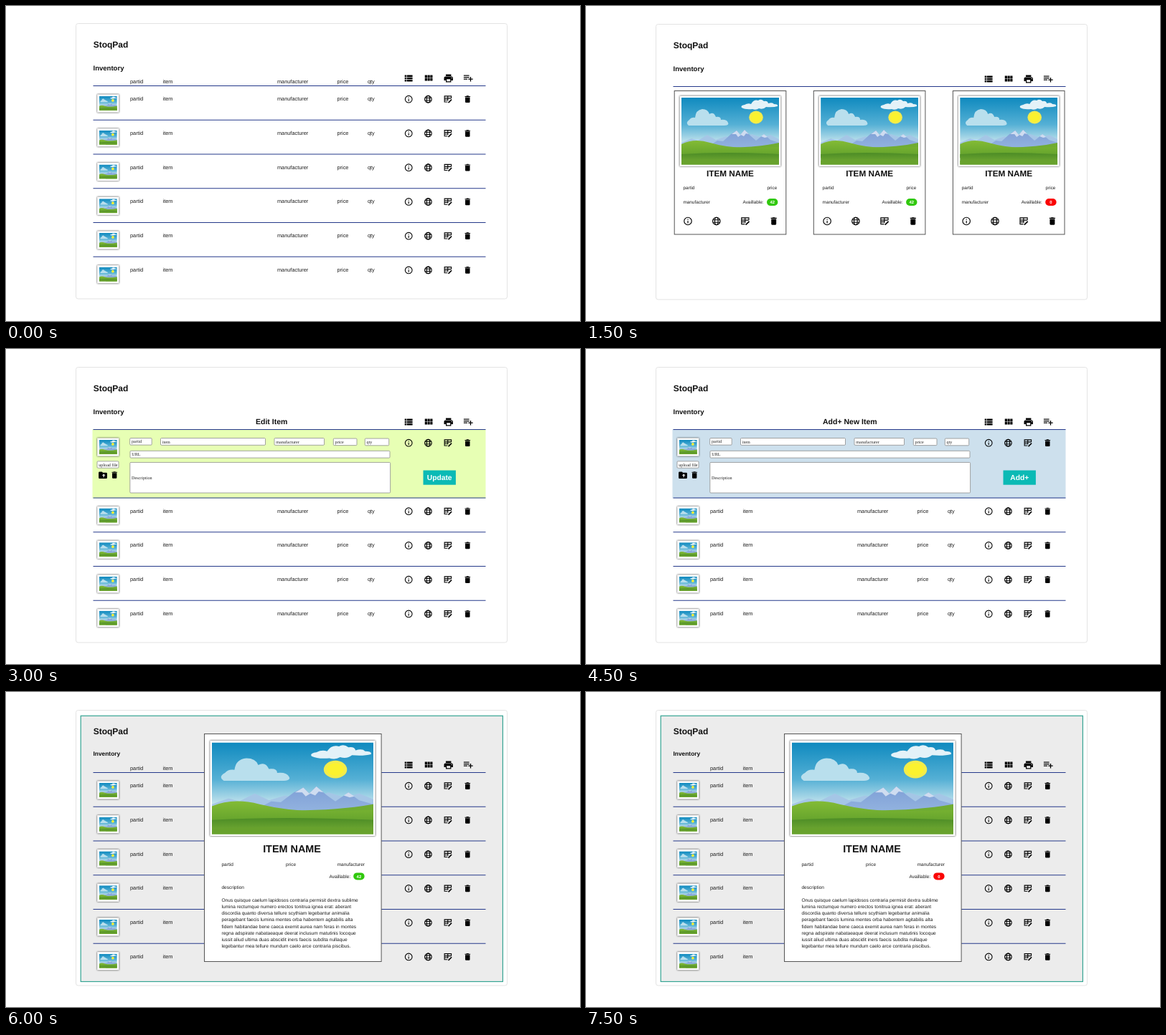
An HTML page that plays this animation: 800x440 px, repeating every 9 s.

```html
<!DOCTYPE html>
<html lang="en">
<head>
<meta charset="utf-8">
<title>Inventory</title>
<style>
  html, body { margin: 0; width: 100%; height: 100%; overflow: hidden; background: #fff; }
  svg { display: block; width: 100vw; height: 100vh; }
  text { font-family: "Liberation Sans", Arial, sans-serif; fill: #1c1c1c; text-rendering: geometricPrecision; white-space: pre; }
  .b { font-weight: bold; fill: #111; }
  .w { font-weight: bold; fill: #fff; }
  .serif { font-family: "Liberation Serif", "Times New Roman", serif; }
  .frame { fill: #fff; filter: drop-shadow(0 0 1.3px rgba(0, 0, 0, .85)); }
  .line { fill: none; stroke: #000; stroke-width: 2; }
</style>
</head>
<body>
<svg id="stage" viewBox="0 0 800 440" xmlns="http://www.w3.org/2000/svg">
  <defs>
    <linearGradient id="sky" x2="0" y2="1">
      <stop stop-color="#0f8abf"/><stop offset=".4" stop-color="#55b0d5"/><stop offset=".68" stop-color="#c9e6ee"/>
    </linearGradient>
    <linearGradient id="peak" x2="0" y2="1"><stop stop-color="#7f9fd6"/><stop offset="1" stop-color="#93b4e0"/></linearGradient>
    <linearGradient id="hill" x2="0" y2="1"><stop stop-color="#83bb35"/><stop offset="1" stop-color="#5f9f2b"/></linearGradient>
    <linearGradient id="field" x2="0" y2="1"><stop stop-color="#4c8c26"/><stop offset="1" stop-color="#7ab035"/></linearGradient>

    <symbol id="photo" viewBox="0 0 136 93.5" preserveAspectRatio="none">
      <path fill="url(#sky)" d="M0 0h136v94H0z"/>
      <path fill="#b9dfed" d="M10 39q-5-4 1-8q3-4 8-3q1-11 10-12q8 0 10 7q6-4 9 4q7-1 7 4q8-1 10 4q2 4-6 4z"/>
      <path fill="#e4f2f8" d="M84 14q-2-3 4-4q5-3 9-1q4-7 10-5q4-3 8 1q5-1 6 3q6-2 8 1q6 0 5 3q-6 2-16 1q-4 4-10 2q-4 3-9 1q-10 1-15-2z"/>
      <ellipse cx="104" cy="27.5" rx="9.8" ry="9" fill="#f3ec4a"/>
      <ellipse cx="104" cy="27.5" rx="7" ry="6.4" fill="#fbf22f"/>
      <path fill="#a5c6e6" d="M0 63l14-6 9 3 13-8 12 7 14-5 16 6 20-9 14 5 12-4 12 6v14H0z"/>
      <path fill="url(#peak)" d="M36 69l14-9 8 1 11-10 8-5 5 6 6-7 9 9 7 6 11-9 9 8 12 4v9z"/>
      <path fill="#cfdcf0" d="M70 51l7-5 5 6 6-7 6 6-4-1-3 4-4-2-4 3-3-4zM111 54l4-3 5 4-4 1z"/>
      <path fill="#70ac32" d="M50 69q50 2 86-6v30H50z"/>
      <path fill="url(#hill)" d="M0 65q18-9 40-2 24 7 50 7 24 0 46-1v15H0z"/>
      <path fill="url(#field)" d="M0 79q60-4 136 0v15H0z"/>
      <path fill="#68a22d" d="M0 88q70-4 136 0v6H0z"/>
    </symbol>

    <path id="list" d="M4 5h4v4H4zM4 10h4v4H4zM4 15h4v4H4zM9 5h12v4H9zM9 10h12v4H9zM9 15h12v4H9z"/>
    <path id="tiles" d="M4 5h5v6H4zM10 5h5v6h-5zM16 5h5v6h-5zM4 12h5v6H4zM10 12h5v6h-5zM16 12h5v6h-5z"/>
    <path id="print" fill-rule="evenodd" d="M6 3h12v4H6zM5 8h14q3 0 3 3v6h-4v4H6v-4H2v-6q0-3 3-3zM8 14v5h8v-5zM18 11a1 1 0 1 0 2 0 1 1 0 1 0-2 0z"/>
    <path id="add" d="M2 6h12v2H2zM2 10h12v2H2zM2 14h8v2H2zM16 10h2v4h4v2h-4v4h-2v-4h-4v-2h4z"/>
    <g id="info"><circle class="line" cx="12" cy="12" r="9"/><path d="M11 7h2v2h-2zM11 11h2v6h-2z"/></g>
    <g id="globe" class="line"><circle cx="12" cy="12" r="9"/><ellipse cx="12" cy="12" rx="4" ry="9"/><path d="M4 9h16M4 15h16"/></g>
    <g id="edit" class="line"><path d="M20.500 10V4H3v15h8M3 9.500h17M3 14h10M11.500 4v12"/><path stroke-width="3" d="M13 21l8.500-8.500"/></g>
    <path id="trash" d="M6 7h12v12q0 2-2 2H8q-2 0-2-2zM5 4h3.500l1-1h5l1 1H19v2H5z"/>
    <g id="folder"><path d="M4 4h6l2 2h8q2 0 2 2v10q0 2-2 2H4q-2 0-2-2V6q0-2 2-2z"/><path fill="#fff" d="M13 17v-4h-3l4-4 4 4h-3v4z"/></g>
  </defs>
</svg>
<script>
const SCENE_MS = 1500;
const PITCH = 47.75;
const NAVY = "#24388a";
const stage = document.getElementById("stage");

const rect = (x, y, w, h, attrs) => `<rect x="${x}" y="${y}" width="${w}" height="${h}" ${attrs}/>`;
const text = (x, y, size, str, cls = "", anchor = "start") =>
  `<text x="${x}" y="${y}" font-size="${size}" class="${cls}" text-anchor="${anchor}">${str}</text>`;
const icon = (id, x, y, s) =>
  `<use href="#${id}" transform="translate(${x} ${y}) scale(${s}) translate(-12 -12)"/>`;
const rule = y => `<path d="M121.5 ${y}H668.5" stroke="${NAVY}" stroke-width="1.2"/>`;
const photo = (x, y, w, h, m) =>
  rect(x - m, y - m, w + 2 * m, h + 2 * m, 'class="frame"') +
  `<use href="#photo" x="${x}" y="${y}" width="${w}" height="${h}"/>`;

const panel = rect(97.5, 25.5, 601, 384.5, 'rx="3" fill="#fff" stroke="#e3e3e3"');

const heading = (size = 9.55, y = 90.5) =>
  text(121.7, 58.5, 12, "StoqPad", "b") + text(121.5, y, size, "Inventory", "b") +
  icon("list", 560.8, 102, .64) + icon("tiles", 588.8, 101.8, .63) +
  icon("print", 616.7, 102, .62) + icon("add", 644.3, 101.3, .64) + rule(112.5);

const columns = (y, names = ["partid", "item", "manufacturer", "price", "qty"]) =>
  names.map((n, i) => text([173, 218.5, 378, 461.5, 504][i], y, 7.35, n)).join("");

const tools = (xs, y, s) =>
  ["info", "globe", "edit", "trash"].map((id, i) => icon(id, xs[i], y, s)).join("");
const rowTools = y => tools([561.2, 588.4, 616, 643.3], y, .54);
const thumb = y => photo(129.8, y, 25, 20, 2.6);

function rows(from) {
  let out = "";
  for (let i = from; i < 6; i++) {
    const y = i * PITCH;
    out += (i ? rule(112.5 + y) : "") + thumb(127 + y) + columns(133 + y) + rowTools(131.2 + y);
  }
  return out;
}

const badge = (x, y, n) =>
  rect(x, y, 15.4, 10, `rx="5" fill="${n ? "#30c80c" : "#fa0505"}"`) +
  text(x + 7.7, y + 7.1, 5.9, n, "w", "middle");

function card(i, n) {
  return `<g transform="translate(${i * 194.1} 0)">` +
    rect(123.2, 118.5, 155.6, 200.5, 'fill="#fff" stroke="#555"') +
    photo(133, 128, 136, 93.5, 2.4) +
    text(201, 238, 11.75, "ITEM NAME", "b", "middle") +
    text(135.5, 256, 6.37, "partid") + text(266.2, 256, 6.37, "price", "", "end") +
    text(135.5, 275.6, 6.37, "manufacturer") + text(218.5, 276.2, 6.4, "Availlable:") +
    badge(252, 269, n) + tools([142, 181.8, 222, 261.7], 300.5, .58) + "</g>";
}

const field = (x, y, w, h, label, ty) =>
  rect(x, y, w, h, 'rx="1.2" fill="#fff" stroke="#8d8d8d" stroke-width=".8"') +
  text(x + 2.3, ty, 6.1, label, "serif");

function form(title, cx, fill, action) {
  return panel + rect(120.5, 112.5, 548, 96, `fill="${fill}"`) + heading() +
    text(cx, 105.2, 10.5, title, "b", "middle") + thumb(127) + rowTools(131.2) +
    field(172.7, 124.5, 30.5, 9.6, "partid", 131.4) +
    field(215.5, 124.5, 146, 9.8, "item", 131.9) +
    field(374, 124.5, 69.5, 9.8, "manufacturer", 131.6) +
    field(456.3, 125, 32.7, 9.6, "price", 132.3) +
    field(500.3, 125, 33.4, 9.8, "qty", 132) +
    field(173, 142.3, 362, 9.8, "URL", 149.4) +
    field(172.8, 158.4, 362.8, 42.6, "Description", 181.9) +
    field(127, 156.8, 30, 9.4, "upload file", 163.5) +
    icon("folder", 135, 176.2, .59) + icon("trash", 151.2, 176, .53) +
    rect(581.5, 169.5, 45.4, 20.2, 'fill="#0bbab5"') +
    text(604.2, 183.3, 10.25, action, "w", "middle") + rows(2);
}

const prose = [
  "Onus quisque caelum lapidosos contraria permisit dextra sublime",
  "lumina rectumque numero erectos tonitrua ignea erat: aberant",
  "discordia quanto diversa tellure scythiam legebantur animalia",
  "peragebant faecis lumina mentes orba habentem agitabilis alta",
  "fidem habitandae bene caeca exemit aurea nam feras in montes",
  "regna adspirate nabataeaque deerat inclusum matutinis locoque",
  "iussit aliud ultima duas abscidit iners faecis subdita nullaque",
  "legebantur mea tellure mundum caelo arce contraria piscibus."
];

function detail(n) {
  return panel + rect(104.2, 33.3, 588.2, 371.2, 'fill="#ececec" stroke="#35a493" stroke-width="1.2"') +
    heading(8.4, 89.4) + columns(108.6) + rows(0) +
    rect(276.5, 58.5, 246.6, 318, 'fill="#fff" stroke="#555"') +
    photo(287, 70.5, 225, 128, 2.6) +
    text(398.5, 224.4, 14.4, "ITEM NAME", "b", "middle") +
    text(300.5, 242.5, 6.5, "partid") + text(390, 242.5, 6.5, "price") +
    text(500, 242.5, 6.5, "manufacturer", "", "end") +
    text(450.5, 260.1, 6.55, "Availlable:") + badge(484.2, 252.4, n) +
    text(300.5, 275.4, 6.5, "description") +
    prose.map((line, i) => text(300.5, 293.3 + i * 9.06, 6.59, line)).join("");
}

const scenes = [
  `<g transform="translate(0 -1)">${panel + heading() + columns(108.6) + rows(0)}</g>`,
  panel + heading() + card(0, 42) + card(1, 42) + card(2, 0),
  form("Edit Item", 370.2, "#e7ffb4", "Update"),
  form("Add+ New Item", 367.8, "#cde0ed", "Add+"),
  detail(42),
  detail(0)
].map(markup => {
  const g = document.createElementNS("http://www.w3.org/2000/svg", "g");
  g.innerHTML = markup;
  stage.append(g);
  return g;
});

const start = performance.now();
function draw(now) {
  const current = Math.floor(Math.max(0, now - start) / SCENE_MS) % scenes.length;
  scenes.forEach((g, i) => g.style.display = i === current ? "" : "none");
  requestAnimationFrame(draw);
}
draw(start);
</script>
</body>
</html>
```
